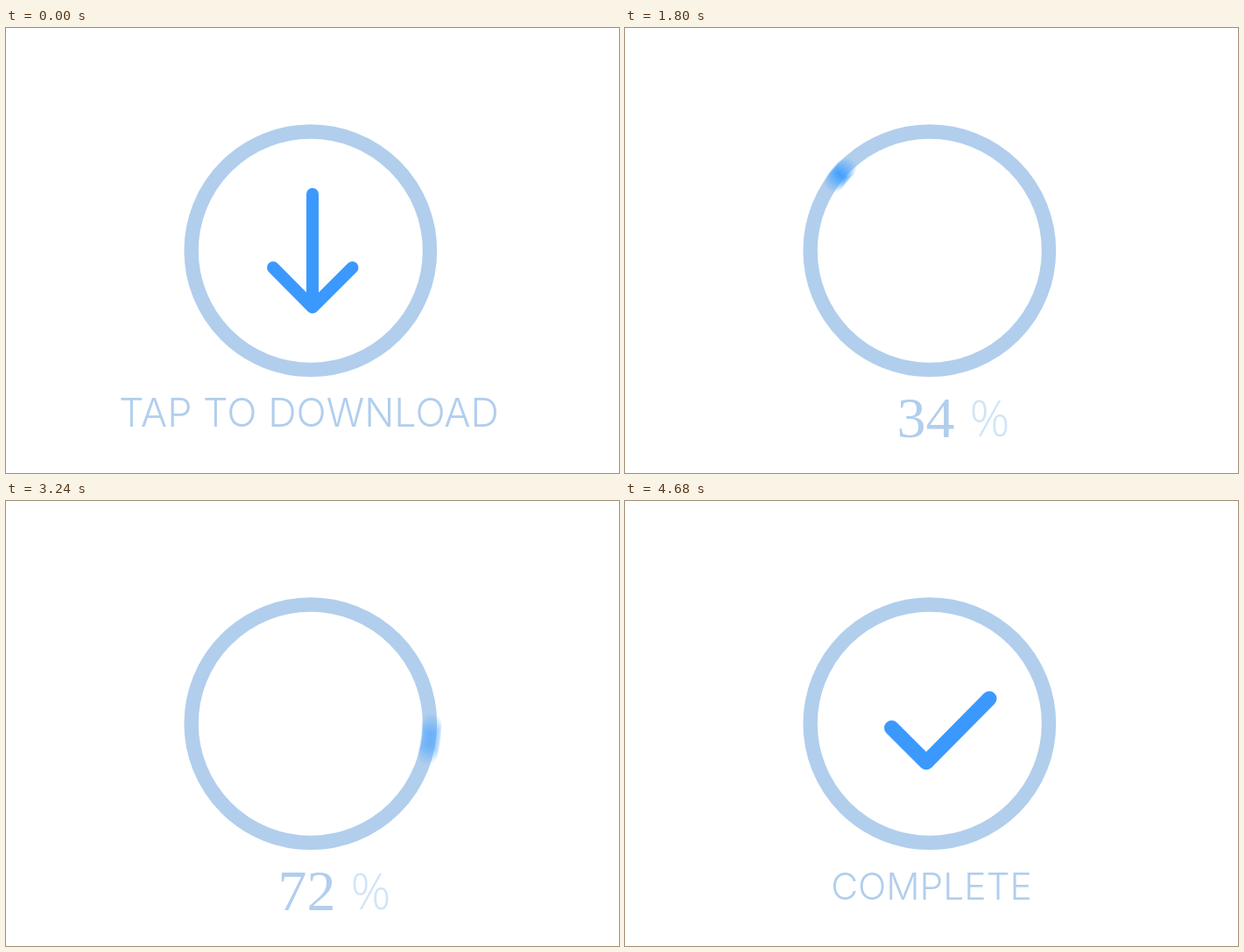
These frames come from a looping animation (700 by 509 pixels, 6480 ms). An HTML page with a canvas:

```html
<!DOCTYPE html>
<html lang="en">
<head>
<meta charset="utf-8">
<title>Download</title>
<style>
  html, body { margin: 0; width: 700px; height: 509px; overflow: hidden; background: #fff; }
  svg, canvas { position: absolute; left: 0; top: 0; }
  text { fill: #b1ceed; text-anchor: middle; }
  .label { font-family: Inter, "Liberation Sans", sans-serif; font-weight: 300; }
  #count { font: 66px "Liberation Serif", serif; }
  #unit { font: 300 57px "Open Sans", sans-serif; fill: #d0e4f8; }
  path { fill: none; stroke: #3b99fe; stroke-linecap: round; stroke-linejoin: round; }
</style>
</head>
<body>
<svg width="700" height="509">
  <circle cx="347.8" cy="254.7" r="136.2" fill="none" stroke="#b1ceed" stroke-width="16.4"/>
  <text id="tap" class="label" x="346" y="455.5" font-size="45">TAP TO DOWNLOAD</text>
  <g id="percent">
    <text id="count" x="343.5" y="468"></text>
    <text id="unit" x="416.5" y="467">%</text>
  </g>
  <text id="done" class="label" x="350" y="455.5" font-size="42.5">COMPLETE</text>
  <path id="arrow"/>
  <path id="check" d="M304.5 259.5L344 299L416 226" stroke-width="17" pathLength="1"/>
</svg>
<canvas id="layer" width="700" height="509"></canvas>
<script>
const LOOP = 6480, STEP = 40;
const CENTER = [350, 255], ORBIT = 136, DOT = 11.5;
const LAUNCH = 480, ON_RING = 600, OFF_RING = 4240, LANDED = 4360, END = 4680;
const SAMPLES = 16;

const el = id => document.getElementById(id);
const tap = el('tap'), percent = el('percent'), count = el('count');
const done = el('done'), arrow = el('arrow'), check = el('check');
const ctx = el('layer').getContext('2d');

const ramp = (t, a, b) => Math.min(1, Math.max(0, (t - a) / (b - a)));
const smooth = p => p * p * (3 - 2 * p);
const lerp = (a, b, p) => a + (b - a) * p;
const mix = (a, b, p) => [lerp(a[0], b[0], p), lerp(a[1], b[1], p)];

// Counterclockwise position on the ring; the spin keeps speeding up.
function orbit(t) {
  const n = (t - 640) / STEP;
  const deg = 20.2 + n * (7.696 + n * (0.1922 + n * (0.000349 - n * 4.8e-6)));
  const a = deg * Math.PI / 180;
  return [CENTER[0] - ORBIT * Math.sin(a), CENTER[1] - ORBIT * Math.cos(a)];
}

function dotAt(t) {
  if (t < ON_RING) return mix(CENTER, orbit(ON_RING), ramp(t, LAUNCH, ON_RING));
  if (t <= OFF_RING) return orbit(t);
  return mix(orbit(OFF_RING), [304.5, 259.5], ramp(t, OFF_RING, LANDED));
}

// Motion blur: average the dot over half a step.
function drawDot(t) {
  ctx.clearRect(0, 0, 700, 509);
  if (t < LAUNCH || t > LANDED) return;
  ctx.globalCompositeOperation = 'lighter';
  ctx.globalAlpha = 1 / SAMPLES;
  ctx.fillStyle = '#3b99fe';
  const r = lerp(DOT, 8.5, ramp(t, OFF_RING, LANDED));
  for (let i = 0; i < SAMPLES; i++) {
    const [x, y] = dotAt(t + ((i + 0.5) / SAMPLES - 0.5) * STEP / 2);
    ctx.beginPath();
    ctx.arc(x, y, r, 0, 7);
    ctx.fill();
  }
}

function drawArrow(t) {
  const p = smooth(ramp(t, 120, LAUNCH));
  const at = (x, y) => mix([x, y], CENTER, p).join(' ');
  arrow.setAttribute('d', `M${at(350, 190)}L${at(350, 319.5)}` +
    `M${at(305, 274)}L${at(350, 319.5)}L${at(395.5, 274)}`);
  arrow.setAttribute('stroke-width', lerp(14, 2 * DOT, p));
  arrow.style.display = t < LAUNCH ? '' : 'none';
}

function drawCheck(t) {
  const p = smooth(ramp(t, LANDED, END));
  check.style.display = p > 0 ? '' : 'none';
  check.style.strokeDasharray = p < 1 ? `${p} 2` : 'none';
}

function render(t) {
  drawArrow(t);
  drawDot(t);
  drawCheck(t);
  count.textContent = Math.round(100 * ramp(t, 480, 4320));
  tap.style.opacity = 1 - ramp(t, 120, 440);
  percent.style.opacity = ramp(t, 400, 560) * (1 - ramp(t, 4320, 4480));
  done.style.opacity = ramp(t, 4440, END);
}

const start = performance.now();
function tick() {
  const t = (performance.now() - start) % LOOP;
  render(Math.floor(t / STEP) * STEP);
  requestAnimationFrame(tick);
}
tick();
</script>
</body>
</html>
```
